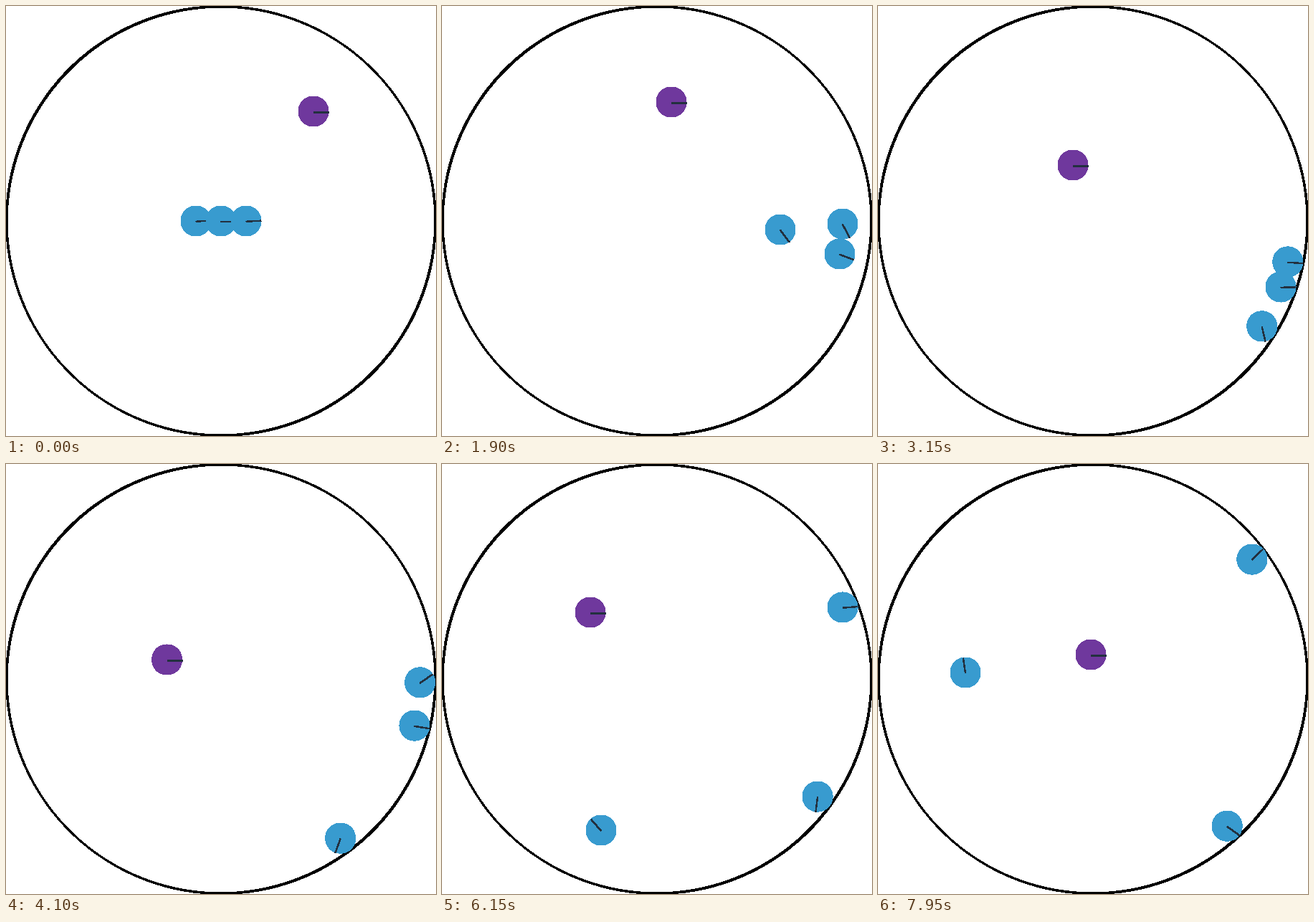
Recreate the animation shown at these times as a matplotlib script. Size 600 px wide and 600 px high, loop 8000 ms.

```python
import numpy as np
import matplotlib.pyplot as plt
from matplotlib.animation import FuncAnimation
from matplotlib.patches import Circle

SIZE, DPI = 600, 100
FRAMES, STEP = 160, 50
REACH, RADIUS = 277.7, 21
PX = 72 / DPI
CENTER = 300 + 300j
BLUE, PURPLE, INK = "#389bcf", "#6f389d", "#23303f"

times = np.arange(FRAMES) * STEP / 1000
stops = np.array([0, 0.9, 1.9, 3.15, 5, 6.15, 7.95])


def outward(z):
    return np.exp(1j * np.angle(z))


def route(poses, speed):
    """Steer through poses (x, y, heading in degrees), sliding along the wall."""
    x, y, deg = np.array(poses).T
    z = x + 1j * y - CENTER
    at_wall = np.abs(z) > REACH - 1.2

    # The wall takes away the outward part of the velocity.
    local = speed * np.exp(1j * np.radians(deg)) / outward(z)
    local = np.where(at_wall, np.minimum(local.real, 0), local.real) + 1j * local.imag
    v = local * outward(z)

    i = np.clip(np.searchsorted(stops, times, side="right") - 1, 0, len(stops) - 2)
    h = stops[i + 1] - stops[i]
    u = (times - stops[i]) / h
    path = ((1 + 2 * u) * (1 - u) ** 2 * z[i] + u * (1 - u) ** 2 * h * v[i]
            + u * u * (3 - 2 * u) * z[i + 1] + u * u * (u - 1) * h * v[i + 1])
    sliding = at_wall[i] & at_wall[i + 1]
    r = np.where(sliding, REACH, np.minimum(np.abs(path), REACH))
    return r * outward(path)


def facing(path, speed):
    """Direction of travel; near the wall the lost speed points outward."""
    local = np.gradient(path, times) / outward(path)
    push = np.sqrt(np.maximum(speed ** 2 - local.imag ** 2, 0))
    near = np.clip((np.abs(path) - REACH + 5) / 5, 0, 1)
    radial = local.real * (1 - near) + push * near
    return np.angle((radial + 1j * local.imag) * outward(path))


class Bot:
    def __init__(self, ax, order, color, speed, poses, turns=True):
        path = route(poses, speed)
        self.pos = path + CENTER
        self.angle = facing(path, speed) if turns else np.zeros(FRAMES)
        self.body = ax.add_patch(Circle((0, 0), RADIUS, fc=color, ec="none",
                                        antialiased=False, zorder=order))
        self.needle, = ax.plot([], [], color=INK, lw=1.4 * PX, antialiased=False,
                               solid_capstyle="butt", zorder=order + 0.5)

    def show(self, i):
        p = self.pos[i]
        self.body.center = p.real, p.imag
        p += 0.8j
        tip = p + RADIUS * np.exp(1j * self.angle[i])
        self.needle.set_data([p.real, tip.real], [p.imag, tip.imag])
        return self.body, self.needle


fig = plt.figure(figsize=(SIZE / DPI, SIZE / DPI), dpi=DPI, facecolor="white")
ax = fig.add_axes([0, 0, 1, 1])
ax.set_xlim(0, SIZE)
ax.set_ylim(SIZE, 0)
ax.axis("off")

# Two shifted rings make a stroke that is heavier along one diagonal.
for shift in (-0.5, 0.5):
    ax.add_patch(Circle((300 + shift, 300 + shift), 299.2, fill=False, ec="black",
                        lw=1.6 * PX, antialiased=False, zorder=1))

bots = [
    Bot(ax, 2, BLUE, 140, [
        (265, 300, 0), (368, 238, -9), (472, 312, 53), (562, 392, -3),
        (570, 363, 14), (524, 464, 98), (487, 505, 35)]),
    Bot(ax, 3, BLUE, 140, [
        (300, 300, 0), (420, 330, 8), (555, 346, 21), (572, 357, 4),
        (568, 227, -53), (559, 200, -3), (522, 133, -43)]),
    Bot(ax, 4, BLUE, 140, [
        (335, 300, 0), (441, 247, -14), (559, 304, 62), (536, 447, 76),
        (362, 565, 172), (222, 511, 229), (122, 291, 262)]),
    Bot(ax, 5, PURPLE, 70, [
        (429, 147, -130), (384, 97, 197), (320, 134, 128), (272, 222, 139),
        (222, 274, -55), (207, 207, -100), (297, 266, 48)], turns=False),
]


def draw(i):
    return [part for bot in bots for part in bot.show(i)]


anim = FuncAnimation(fig, draw, frames=FRAMES, interval=STEP, repeat=True,
                     repeat_delay=0, blit=False)
plt.show()
```
